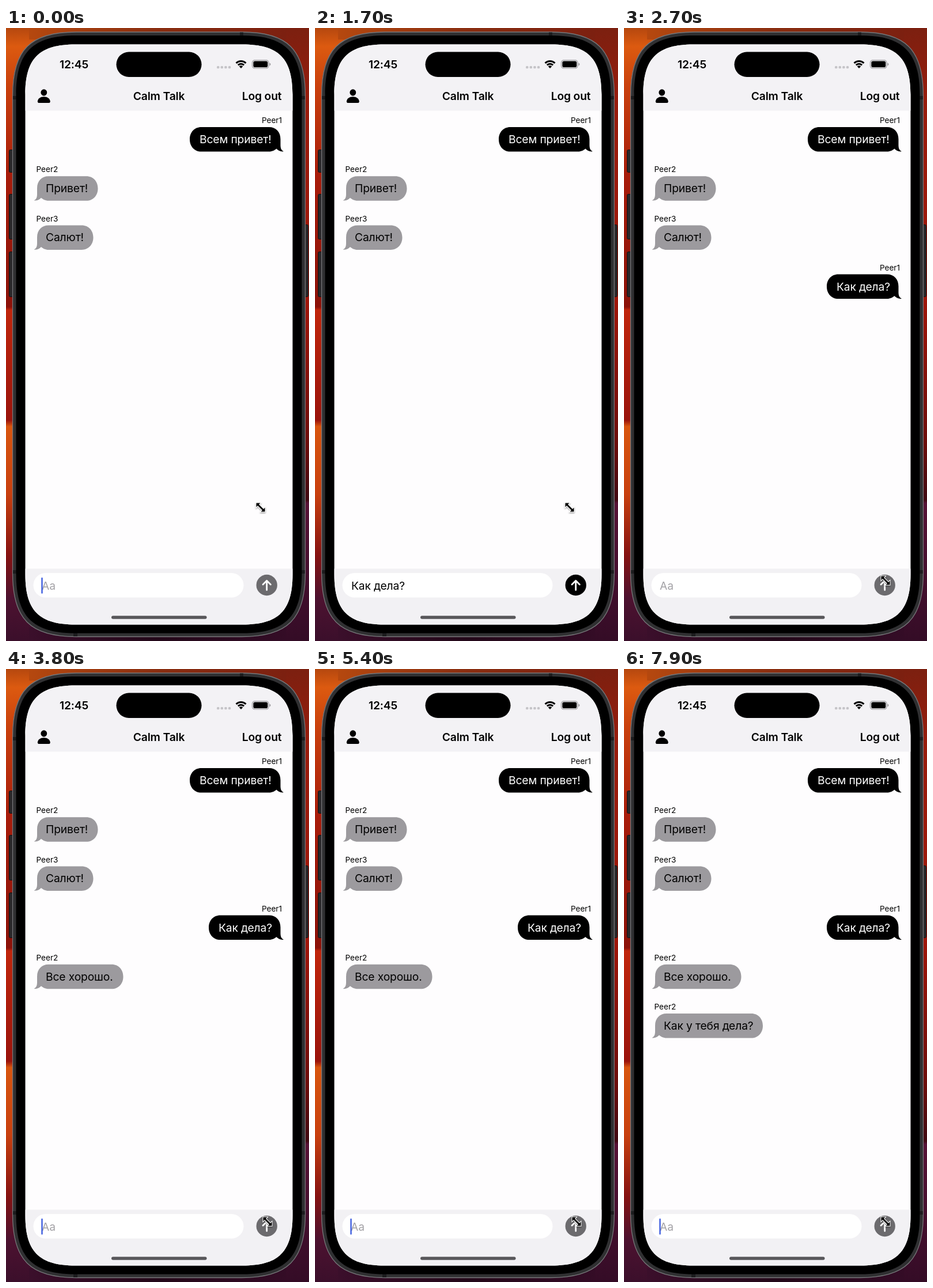
These frames come from a looping animation (526x1064 px, 8000 ms). An HTML page:

```html
<!DOCTYPE html>
<html lang="ru">
<head>
<meta charset="utf-8">
<title>Chat</title>
<style>
  html, body { margin: 0; width: 100%; height: 100%; overflow: hidden; background: #000; }
  svg { display: block; width: 526px; height: 1064px; }
  text { font-family: Inter, "Open Sans", sans-serif; font-size: 19.3px; letter-spacing: -.15px; white-space: pre; }
  .bold { font-weight: 600; }
  .name { font-size: 13.6px; letter-spacing: 0; }
</style>
</head>
<body>
<svg viewBox="0 0 526 1064">
  <defs>
    <linearGradient id="left" x2="0" y2="1">
      <stop offset="0" stop-color="#b5480f"/><stop offset=".03" stop-color="#dc5a10"/>
      <stop offset=".1" stop-color="#c83f0d"/><stop offset=".24" stop-color="#a81d0b"/>
      <stop offset=".455" stop-color="#8c1209"/><stop offset=".46" stop-color="#c0260c"/>
      <stop offset=".64" stop-color="#9a140c"/><stop offset=".65" stop-color="#d8560f"/>
      <stop offset=".76" stop-color="#c8400f"/><stop offset=".86" stop-color="#861312"/>
      <stop offset=".93" stop-color="#4d1230"/><stop offset="1" stop-color="#3b0f2b"/>
    </linearGradient>
    <linearGradient id="right" x2="0" y2="1">
      <stop offset="0" stop-color="#7c2010"/><stop offset=".12" stop-color="#981c0c"/>
      <stop offset=".44" stop-color="#a0160a"/><stop offset=".68" stop-color="#6c0d0b"/>
      <stop offset=".77" stop-color="#400911"/><stop offset=".775" stop-color="#571236"/>
      <stop offset="1" stop-color="#340c26"/>
    </linearGradient>
    <linearGradient id="top"><stop offset="0" stop-color="#b5480f"/><stop offset=".5" stop-color="#8a2e10"/><stop offset="1" stop-color="#7c2010"/></linearGradient>
    <linearGradient id="bottom"><stop offset="0" stop-color="#3b0f2b"/><stop offset=".5" stop-color="#230819"/><stop offset="1" stop-color="#340c26"/></linearGradient>
    <clipPath id="screen"><path id="glass"/></clipPath>
    <filter id="shadow" x="-50%" y="-50%" width="200%" height="200%">
      <feDropShadow dx="0" dy="1.5" stdDeviation="1" flood-opacity=".45"/>
    </filter>
  </defs>

  <!-- wallpaper -->
  <rect width="263" height="1064" fill="url(#left)"/>
  <rect x="263" width="263" height="1064" fill="url(#right)"/>
  <rect x="40" width="446" height="20" fill="url(#top)"/>
  <rect x="40" y="1040" width="446" height="24" fill="url(#bottom)"/>

  <!-- phone -->
  <g fill="#29282a" stroke="#121112">
    <rect x="5.5" y="211.5" width="9" height="39" rx="2"/>
    <rect x="5.5" y="288.5" width="9" height="78" rx="2"/>
    <rect x="5.5" y="388.5" width="9" height="78" rx="2"/>
    <rect x="515.5" y="341.5" width="9" height="125" rx="2"/>
  </g>
  <path id="frame" fill="#303032" stroke="#77777a" stroke-width="1.3"/>
  <g fill="#1c1c1e">
    <rect x="12" y="118" width="7" height="6"/><rect x="512" y="118" width="7" height="6"/>
    <rect x="12" y="941" width="7" height="6"/><rect x="512" y="941" width="7" height="6"/>
    <rect x="406" y="7.5" width="6" height="7"/><rect x="117" y="1050" width="7" height="6"/>
  </g>
  <path id="bezel"/>
  <g clip-path="url(#screen)">
    <rect x="33" y="28" width="465" height="1008" fill="#fefdfe"/>
    <rect x="33" y="28" width="465" height="115.5" fill="#f3f2f5"/>
    <rect x="33" y="938.5" width="465" height="98" fill="#f2f1f4"/>
  </g>

  <!-- status bar -->
  <text class="bold" x="118" y="70.3" text-anchor="middle">12:45</text>
  <rect x="191.5" y="41.5" width="148" height="43.5" rx="21.75"/>
  <g fill="#c5c4c8">
    <rect x="366" y="66" width="4.4" height="4.2" rx="1.5"/><rect x="372.6" y="66" width="4.4" height="4.2" rx="1.5"/>
    <rect x="379.2" y="66" width="4.4" height="4.2" rx="1.5"/><rect x="385.8" y="66" width="4.4" height="4.2" rx="1.5"/>
  </g>
  <g id="wifi" fill="none" stroke="#000" stroke-width="3"></g>
  <rect x="427.5" y="55.8" width="28.5" height="14.2" rx="4.4" fill="none" stroke="#99989c" stroke-width="1.2"/>
  <rect x="429.3" y="57.6" width="25" height="10.6" rx="2.8"/>
  <path d="M457.5 60.6q2 .8 2 2.4t-2 2.4z" fill="#99989c"/>

  <!-- navigation -->
  <ellipse cx="65.8" cy="112" rx="5.4" ry="5.8"/>
  <path d="M57.5 130q-2.8 0-2.6-2.8C55.3 122.5 60 119.3 65.8 119.3S76.3 122.5 76.7 127.2q.2 2.8-2.6 2.8z"/>
  <text class="bold" x="265.5" y="125.2" text-anchor="middle">Calm Talk</text>
  <text class="bold" x="478.5" y="125.2" text-anchor="end">Log out</text>

  <g id="messages"></g>

  <!-- input -->
  <rect x="47.5" y="946" width="365" height="42.5" rx="21.25" fill="#fff"/>
  <text id="hint" x="62" y="974.8" fill="#a3a2a6">Aa</text>
  <text id="draft" x="63" y="974.8"></text>
  <rect id="caret" y="953.8" width="2.4" height="28" rx="1.2" fill="#3c5cde"/>
  <circle id="send" cx="452.7" cy="967" r="18.2"/>
  <path d="M452.7 975.5V959.5M446 966l6.7-6.7 6.7 6.7" fill="none" stroke="#fff" stroke-width="2.8" stroke-linecap="round" stroke-linejoin="round"/>
  <rect x="183" y="1020.2" width="165.5" height="5.6" rx="2.8" fill="#58575a"/>

  <g id="pointer" filter="url(#shadow)">
    <path d="M-7.5-7.5H-.5L-3-5 5 3 7.5.5V7.5H.5L3 5-5-3-7.5-.5Z" stroke="#fff" stroke-width="2" paint-order="stroke"/>
  </g>
</svg>
<script>
const LOOP = 8000, TYPE_START = 200, KEY_GAP = 100, SENT_AT = 2300;
const DRAFT = 'Как дела?';

// edge: the body side opposite the tail; textX: start of the text
const MESSAGES = [
  { name: 'Peer1', text: 'Всем привет!', own: true, edge: 319, textX: 336, at: 0 },
  { name: 'Peer2', text: 'Привет!', edge: 159.5, at: 0 },
  { name: 'Peer3', text: 'Салют!', edge: 151.5, at: 0 },
  { name: 'Peer1', text: DRAFT, own: true, edge: 352, textX: 369, at: SENT_AT },
  { name: 'Peer2', text: 'Все хорошо.', edge: 203.5, at: 3500 },
  { name: 'Peer2', text: 'Как у тебя дела?', edge: 241, at: 7800 },
];

const $ = id => document.getElementById(id);
const clamp = v => Math.max(0, Math.min(1, v));

function add(parent, tag, attrs, text = '') {
  const el = document.createElementNS('http://www.w3.org/2000/svg', tag);
  for (const key in attrs) el.setAttribute(key, attrs[key]);
  el.textContent = text;
  parent.appendChild(el);
  return el;
}

// Rectangle whose corners bend gradually, like the phone's outline
function smoothRect(x, y, w, h, r) {
  const e = r * 1.28, k = r * .355, c = e - k;
  return `M${x + e} ${y}h${w - 2 * e}c${c} 0 ${e} ${k} ${e} ${e}v${h - 2 * e}c0 ${c} ${-k} ${e} ${-e} ${e}
    h${2 * e - w}c${-c} 0 ${-e} ${-k} ${-e} ${-e}v${2 * e - h}c0 ${-c} ${k} ${-e} ${e} ${-e}z`;
}

$('frame').setAttribute('d', smoothRect(11.5, 7, 508, 1049.5, 86));
$('bezel').setAttribute('d', smoothRect(17.5, 13, 496, 1037.5, 81));
$('glass').setAttribute('d', smoothRect(33.5, 28.5, 464, 1007, 68));

// Speech bubble with its tail at the bottom left
function bubblePath(w) {
  return `M20 0H${w - 20}C${w - 8} 0 ${w} 9 ${w} 21.2S${w - 8} 42.5 ${w - 20} 42.5H20
    C14 42.5 10 40 7 37.5C4 41 0 42.8-5.5 42.3C-1 40 0 36 0 31V21C0 8 8 0 20 0Z`;
}

const rows = MESSAGES.map((m, i) => {
  const y = 172 + i * 85.2;
  const row = add($('messages'), 'g', {});
  const width = m.own ? 476.5 - m.edge : m.edge - 54;
  add(row, 'text', { class: 'name', x: m.own ? 479 : 52.5, y: y - 6.8, 'text-anchor': m.own ? 'end' : 'start' }, m.name);
  add(row, 'path', {
    d: bubblePath(width),
    transform: m.own ? `translate(476.5 ${y}) scale(-1 1)` : `translate(54 ${y})`,
    fill: m.own ? '#000' : '#9c9a9e',
  });
  add(row, 'text', { x: m.textX || 69, y: y + 27.9, fill: m.own ? '#fff' : '#000' }, m.text);
  return row;
});

for (const r of [7.3, 12]) {
  const d = r * Math.SQRT1_2;
  add($('wifi'), 'path', { d: `M${408 - d} ${69.5 - d}A${r} ${r} 0 0 1 ${408 + d} ${69.5 - d}` });
}
add($('wifi'), 'path', { d: 'M408 70L404.8 66.7A4.5 4.5 0 0 1 411.2 66.7Z', fill: '#000', stroke: 'none' });

function caretOpacity(t) {
  if (t >= TYPE_START && t < TYPE_START + DRAFT.length * KEY_GAP) return 1;
  const phase = (t + (t < 2800 ? 400 : 0)) % 1000;
  if (phase < 50 || phase >= 400) return 1;
  return clamp((phase - 250) / 150);
}

function render(t) {
  const keys = Math.floor((t - TYPE_START) / KEY_GAP) + 1;
  const typed = t < SENT_AT ? Math.max(0, Math.min(DRAFT.length, keys)) : 0;
  const draft = $('draft');
  draft.textContent = DRAFT.slice(0, typed);
  $('hint').style.display = typed ? 'none' : '';
  $('send').setAttribute('fill', typed ? '#000' : '#6c6b6e');
  $('caret').setAttribute('x', typed ? 63.5 + draft.getComputedTextLength() : 61.3);
  $('caret').setAttribute('opacity', caretOpacity(t));
  rows.forEach((row, i) => { row.style.display = t >= MESSAGES[i].at ? '' : 'none'; });

  const p = clamp((t - 1750) / 400), ease = p * p * (3 - 2 * p);
  $('pointer').setAttribute('transform', `translate(${442 + 12 * ease} ${832 + 127 * ease})`);
}

const start = performance.now();
function tick() {
  render((performance.now() - start) % LOOP);
  requestAnimationFrame(tick);
}
tick();
</script>
</body>
</html>
```
